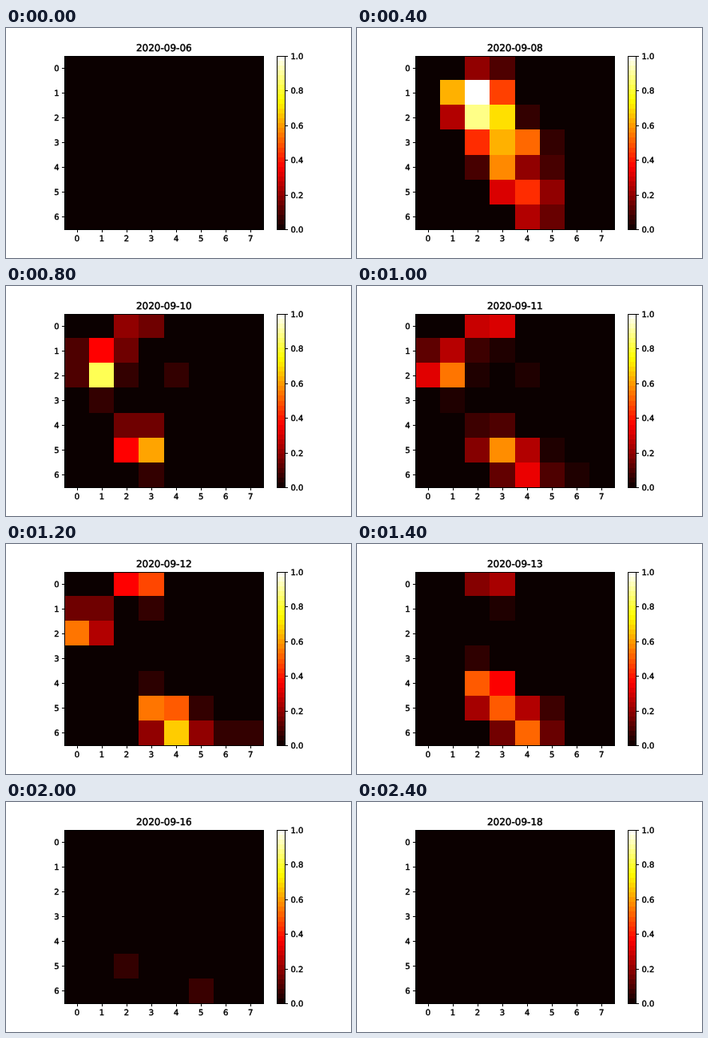
Recreate the animation shown at these times as an HTML page. Size 432 by 288 pixels, loop 3.4 s.

```html
<!DOCTYPE html>
<html lang="en">
<head>
<meta charset="utf-8">
<title>Daily heatmap</title>
<style>
  html, body { margin: 0; width: 100%; height: 100%; overflow: hidden; background: #fff; }
  svg { display: block; width: 432px; height: 288px; }
  text { font: 10px "DejaVu Sans", sans-serif; stroke: #000; stroke-width: .45; text-rendering: geometricPrecision; }
  #title { font-size: 12px; }
</style>
</head>
<body>
<svg id="stage" viewBox="0 0 432 288" text-anchor="middle"></svg>
<script>
const ROWS = 7, COLS = 8, STEP = 200, LOOP = 3400, LAST = 12, BANDS = 36;
const stage = document.getElementById('stage');

// Each entry: row:column=percent, zero cells omitted.
const readings = {
  2: '02=20 03=10 11=63 12=100 13=46 21=25 22=88 23=70 24=6 32=43 33=63 34=52 35=6 ' +
     '42=9 43=57 44=20 45=9 53=31 54=43 55=20 64=25 65=14',
  4: '02=20 03=15 10=10 11=36.5 12=15 20=10 21=83 22=6 24=6 31=6 42=15 43=15 52=36.5 53=61 63=6',
  6: '02=36.5 03=47 10=15 11=15 13=6 20=54 21=25 43=5 53=54 54=50 55=6 63=20 64=67 65=20 66=6 67=6',
  8: '32=11 42=100 43=67 52=46 53=46 55=9 63=11 64=36.5 65=8',
  10: '52=6 65=7',
  11: '52=10 57=6'
};

// Days between readings average their neighbours inside [first column, last column, last row].
const spans = { 1: [1, 4, 2], 3: [1, 5, 6], 5: [0, 6, 6], 7: [2, 5, 6], 9: [2, 7, 6] };

function parse(text = '') {
  const grid = Array(ROWS * COLS).fill(0);
  for (const [, row, col, value] of text.matchAll(/(\d)(\d)=([\d.]+)/g)) {
    grid[row * COLS + +col] = value / 100;
  }
  return grid;
}

function gridFor(day) {
  if (!spans[day]) return parse(readings[day]);
  const [first, last, bottom] = spans[day];
  const before = parse(readings[day - 1]), after = parse(readings[day + 1]);
  return before.map((value, i) => {
    const col = i % COLS, row = Math.floor(i / COLS);
    return col >= first && col <= last && row <= bottom ? (value + after[i]) / 2 : 0;
  });
}

function heat(value) {
  const ramp = (from, to, base = 0) =>
    Math.round(255 * Math.min(1, Math.max(base, base + (1 - base) * (value - from) / (to - from))));
  return `rgb(${ramp(0, .365, .0416)},${ramp(.365, .746)},${ramp(.746, 1)})`;
}

function add(name, attrs, text = '') {
  const node = document.createElementNS('http://www.w3.org/2000/svg', name);
  for (const key in attrs) node.setAttribute(key, attrs[key]);
  node.textContent = text;
  return stage.appendChild(node);
}

const block = (x, y, width, height, fill) =>
  add('rect', { x, y, width, height, fill, 'shape-rendering': 'crispEdges' });
const outline = (x, y, width, height) =>
  add('rect', { x, y, width, height, fill: 'none', stroke: '#000' });
const label = (x, y, text, anchor = 'middle') => add('text', { x, y, 'text-anchor': anchor }, text);

const edgeX = col => Math.round(73 + col * 249 / COLS);
const edgeY = row => Math.round(34 + row * 218 / ROWS);
const tickX = col => 73.34 + 31.06 * (col + .5);
const tickY = row => 34.56 + 31.06 * (row + .5);

add('rect', { width: 432, height: 288, fill: '#fff' });
const title = add('text', { id: 'title', x: 197.8, y: 29 });

const cells = parse().map((_, i) => {
  const col = i % COLS, row = Math.floor(i / COLS);
  const x = edgeX(col), y = Math.max(35, edgeY(row));
  return block(x, y, edgeX(col + 1) - x, edgeY(row + 1) - y, heat(0));
});
outline(73.5, 35.5, 249, 217);

for (let col = 0; col < COLS; col++) {
  block(Math.round(tickX(col)), 253, 1, 3, '#000');
  label(tickX(col), 267, col);
}
for (let row = 0; row < ROWS; row++) {
  const y = Math.round(tickY(row));
  block(70, y, 3, 1, '#000');
  label(66.5, y + 4, row, 'end');
}

const bandY = i => Math.round(252 - 217 * i / BANDS);
for (let i = 0; i < BANDS; i++) {
  block(339, bandY(i + 1), 11, bandY(i) - bandY(i + 1), heat((i + .5) / BANDS));
}
outline(339.5, 35.5, 10, 217);
for (let i = 0; i <= 5; i++) {
  const y = Math.round(252 - 217.44 * i / 5);
  block(350, y, 3, 1, '#000');
  label(356.5, y + 4, (i / 5).toFixed(1), 'start');
}

const days = Array.from({ length: LAST + 1 }, (_, day) => gridFor(day));
let shown = -1;

function draw(time) {
  const day = Math.min(LAST, Math.floor(time % LOOP / STEP));
  if (day === shown) return;
  shown = day;
  title.textContent = '2020-09-' + String(day + 6).padStart(2, '0');
  cells.forEach((cell, i) => cell.setAttribute('fill', heat(days[day][i])));
}

const start = performance.now();
function tick() {
  draw(performance.now() - start);
  requestAnimationFrame(tick);
}
tick();
</script>
</body>
</html>
```
